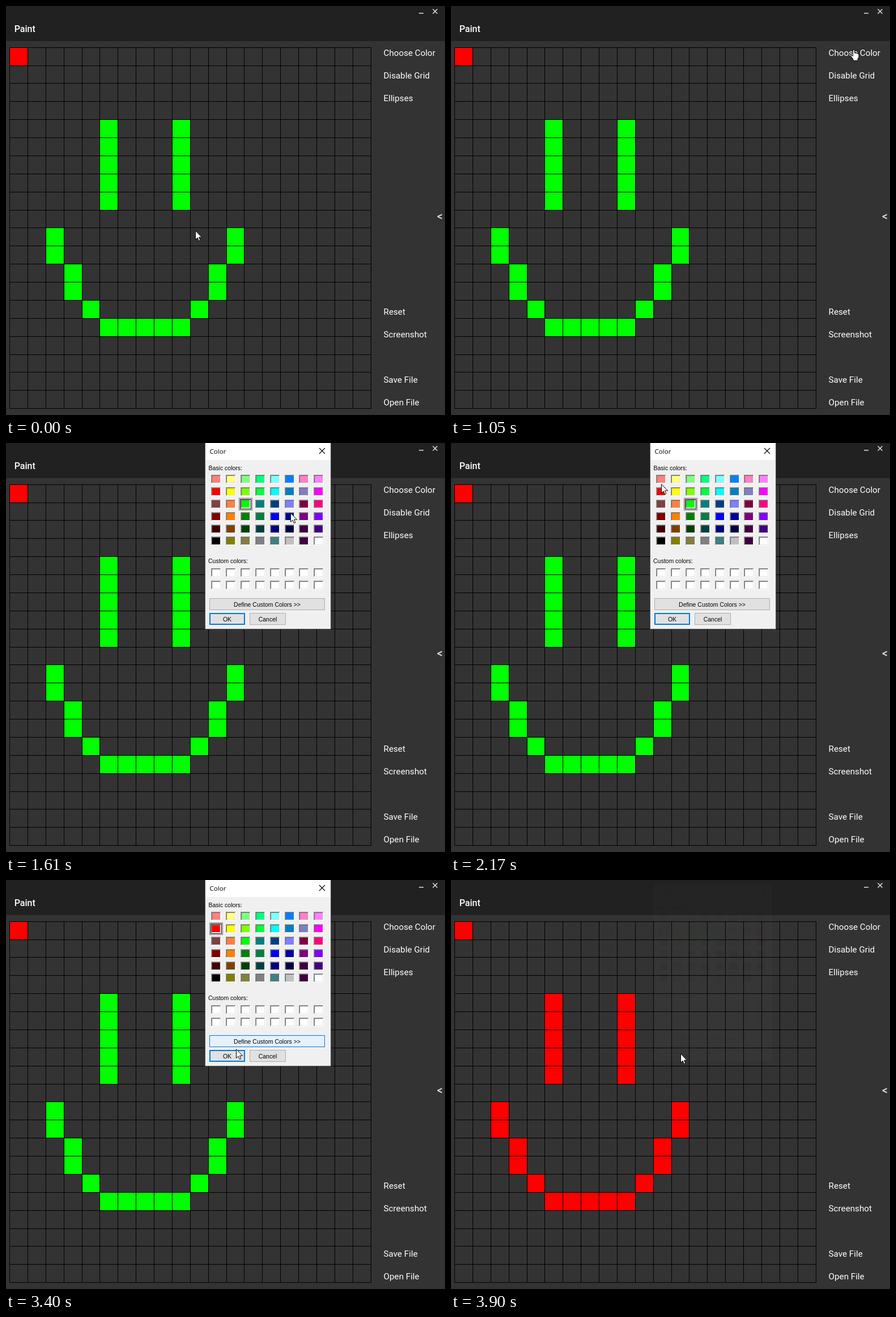
An HTML page with a canvas for the animation above (4.69 s loop, 775 by 722 pixels).

```html
<!DOCTYPE html>
<html lang="en">
<head>
<meta charset="utf-8">
<title>Paint</title>
<style>
  html, body { margin: 0; width: 100%; height: 100%; overflow: hidden; background: #333; }
  canvas { display: block; }
</style>
</head>
<body>
<canvas id="stage" width="775" height="722"></canvas>
<script>
const LOOP = 4690;
const stage = document.getElementById('stage').getContext('2d');
const dialogLayer = document.createElement('canvas');
dialogLayer.width = 775;
dialogLayer.height = 722;
const panel = dialogLayer.getContext('2d');

const SMALL = '10.5px "Liberation Sans", Arial, sans-serif';
const LABEL = '15.2px Roboto, sans-serif';

const labels = [
  ['Choose Color', 88], ['Disable Grid', 128], ['Ellipses', 168], ['Reset', 545],
  ['Screenshot', 585], ['Save File', 665], ['Open File', 705]
];

// Painted strips: column, row, columns wide, rows high
const strips = [
  [5, 4, 1, 5], [9, 4, 1, 5], [2, 10, 1, 2], [12, 10, 1, 2], [3, 12, 1, 2],
  [11, 12, 1, 2], [4, 14, 1, 1], [10, 14, 1, 1], [5, 15, 5, 1]
];

const basicColors = `
  ff8080 ffff80 80ff80 00ff80 80ffff 0080ff ff80c0 ff80ff
  ff0000 ffff00 80ff00 00ff40 00ffff 0080c0 8080c0 ff00ff
  804040 ff8040 00ff00 008080 004080 8080ff 800040 ff0080
  800000 ff8000 008000 008040 0000ff 0000a0 800080 8000ff
  400000 804000 004000 004040 000080 000040 400040 400080
  000000 808000 808040 808080 408080 c0c0c0 400040 ffffff`.trim().split(/\s+/);

const ease = {
  linear: p => p,
  in: p => p * p,
  out: p => p * (2 - p),
  both: p => p * p * (3 - 2 * p)
};

// Pointer keys: time, x, y, easing towards this key
const pointerKeys = [
  [0, 334, 396, 'linear'], [310, 334, 396, 'linear'], [780, 712, 78, 'both'],
  [910, 712, 78, 'linear'], [960, 711, 77, 'linear'], [1230, 711, 77, 'linear'],
  [1420, 629, 118, 'in'], [1610, 503, 123, 'linear'], [2000, 376, 79, 'out'],
  [2030, 371, 72, 'linear'], [2170, 371, 72, 'linear'], [2280, 369, 79, 'linear'],
  [2780, 369, 79, 'linear'], [3060, 395, 235, 'in'], [3400, 406, 298, 'out'],
  [3620, 405, 306, 'out'], [LOOP, 405, 306, 'linear']
];

const progress = (t, from, to) => Math.min(1, Math.max(0, (t - from) / (to - from)));

function pointerAt(t) {
  const i = pointerKeys.findIndex(key => key[0] > t);
  const [t0, x0, y0] = pointerKeys[i - 1];
  const [t1, x1, y1, easing] = pointerKeys[i];
  const p = ease[easing](progress(t, t0, t1));
  return [Math.round(x0 + (x1 - x0) * p), Math.round(y0 + (y1 - y0) * p)];
}

function rect(c, color, x, y, w, h) {
  c.fillStyle = color;
  c.fillRect(x, y, w, h);
}

function frame(c, color, x, y, w, h, line = 1) {
  c.strokeStyle = color;
  c.lineWidth = line;
  c.strokeRect(x + line / 2, y + line / 2, w - line, h - line);
}

function text(c, string, x, y, font, color, align = 'left') {
  c.font = font;
  c.fillStyle = color;
  c.textAlign = align;
  c.fillText(string, x, y);
}

function cross(c, color, x, y, size, line) {
  c.strokeStyle = color;
  c.lineWidth = line;
  c.beginPath();
  c.moveTo(x, y);
  c.lineTo(x + size, y + size);
  c.moveTo(x + size, y);
  c.lineTo(x, y + size);
  c.stroke();
}

const CELL = 31.88;
const gridX = i => Math.round(6 + CELL * i);
const gridY = i => Math.round(72.65 + CELL * i);

function drawCells(color, col, row, cols, rows) {
  rect(stage, color, gridX(col), gridY(row),
    gridX(col + cols) - gridX(col), gridY(row + rows) - gridY(row));
}

function drawWindow(t) {
  rect(stage, '#333', 0, 0, 775, 722);
  rect(stage, '#212121', 0, 0, 775, 62);
  text(stage, 'Paint', 14.7, 46, '500 16px Roboto, sans-serif', '#fff');
  rect(stage, '#ddd', 729, 12, 8, 1.5);
  cross(stage, '#ddd', 753.5, 5.5, 8, 1.6);

  drawCells('#f00', 0, 0, 1, 1);
  const ink = t < 3740 ? '#0f0' : '#f00';
  strips.forEach(strip => drawCells(ink, ...strip));
  const width = gridX(20) - gridX(0) + 1, height = gridY(20) - gridY(0) + 1;
  for (let i = 0; i <= 20; i++) {
    rect(stage, '#000', gridX(i), gridY(0), 1, height);
    rect(stage, '#000', gridX(0), gridY(i), width, 1);
  }

  labels.forEach(([name, y]) => text(stage, name, 666.6, y, LABEL, '#fff'));
  text(stage, '<', 761, 378, '500 19.5px Roboto, sans-serif', '#ddd');
}

function drawSwatch(color, col, row, top) {
  const x = Math.round(362 + 25.9 * col), y = Math.round(top + 21.8 * row);
  rect(panel, '#fff', x, y, 18, 16);
  rect(panel, '#a0a0a0', x, y, 17, 15);
  rect(panel, '#e3e3e3', x + 1, y + 1, 16, 14);
  rect(panel, '#696969', x + 1, y + 1, 15, 13);
  rect(panel, color, x + 2, y + 2, 14, 12);
}

function drawSelection(x, y) {
  panel.setLineDash([1, 1]);
  frame(panel, '#000', x, y, 24, 22);
  panel.setLineDash([]);
  frame(panel, '#000', x + 2, y + 2, 20, 18);
}

function drawButton(name, x, y, w, hovered, isDefault) {
  rect(panel, hovered ? '#e5f1fb' : '#e1e1e1', x, y, w, 21);
  frame(panel, hovered || isDefault ? '#0078d7' : '#adadad', x, y, w, 21, isDefault ? 2 : 1);
  text(panel, name, x + w / 2, y + 15, SMALL, '#000', 'center');
}

function drawDialog(t) {
  panel.clearRect(0, 0, 775, 722);
  rect(panel, '#555', 351, 0, 223, 329);
  rect(panel, '#f0f0f0', 352, 0, 221, 328);
  rect(panel, '#fff', 352, 0, 221, 30);
  text(panel, 'Color', 359.5, 19, '11.6px "Open Sans", sans-serif', '#000');
  cross(panel, '#000', 553, 9, 10, 1.1);

  text(panel, 'Basic colors:', 357.5, 48, SMALL, '#000');
  basicColors.forEach((hex, i) => drawSwatch('#' + hex, i % 8, i >> 3, 56.4));
  text(panel, 'Custom colors:', 357, 212, SMALL, '#000');
  for (let i = 0; i < 16; i++) drawSwatch('#fff', i % 8, i >> 3, 221);
  if (t < 2590) drawSelection(411, 97);
  else drawSelection(359, 75);

  drawButton('Define Custom Colors >>', 359, 274, 204, t >= 3180 && t < 3440);
  drawButton('OK', 359, 300, 63, t >= 3440, true);
  drawButton('Cancel', 430, 300, 64);
}

function placeDialog(t) {
  if (t < 1110) return;
  drawDialog(t);
  const opened = 1 - (1 - progress(t, 1110, 1310)) ** 3;
  const closed = progress(t, 3640, 3900);
  const scale = 0.93 + 0.07 * opened - 0.05 * closed;
  stage.save();
  stage.globalAlpha = opened * (1 - 0.985 * closed);
  stage.translate(462, 164);
  stage.scale(scale, scale);
  stage.drawImage(dialogLayer, -462, -164);
  stage.restore();
}

const arrow = new Path2D('M.5 .8V16.4L4 13.1L6.5 18.6L8.9 17.5L6.5 12.2H11.6Z');
const hand = new Path2D('M-1.5 1Q0-.8 1.5 1V6Q3 5 4.2 6.5Q5.7 5.7 6.8 7.2Q9 6.8 9 9V13L7 17V19.5H-1V17L-5 11.5Q-5.2 9 -3 10L-1.5 11.5Z');

function drawPointer(t) {
  const [x, y] = pointerAt(t);
  const overLabel = x > 660 && t < 1110;
  const shape = overLabel ? hand : arrow;
  stage.save();
  stage.translate(x, y);
  stage.lineJoin = 'round';
  stage.lineWidth = 1;
  stage.fillStyle = '#fff';
  stage.strokeStyle = '#000';
  stage.fill(shape);
  stage.stroke(shape);
  stage.restore();
}

function render(now) {
  const t = now % LOOP;
  drawWindow(t);
  placeDialog(t);
  drawPointer(t);
}

const start = performance.now();
function tick() {
  render(performance.now() - start);
  requestAnimationFrame(tick);
}
tick();
</script>
</body>
</html>
```
